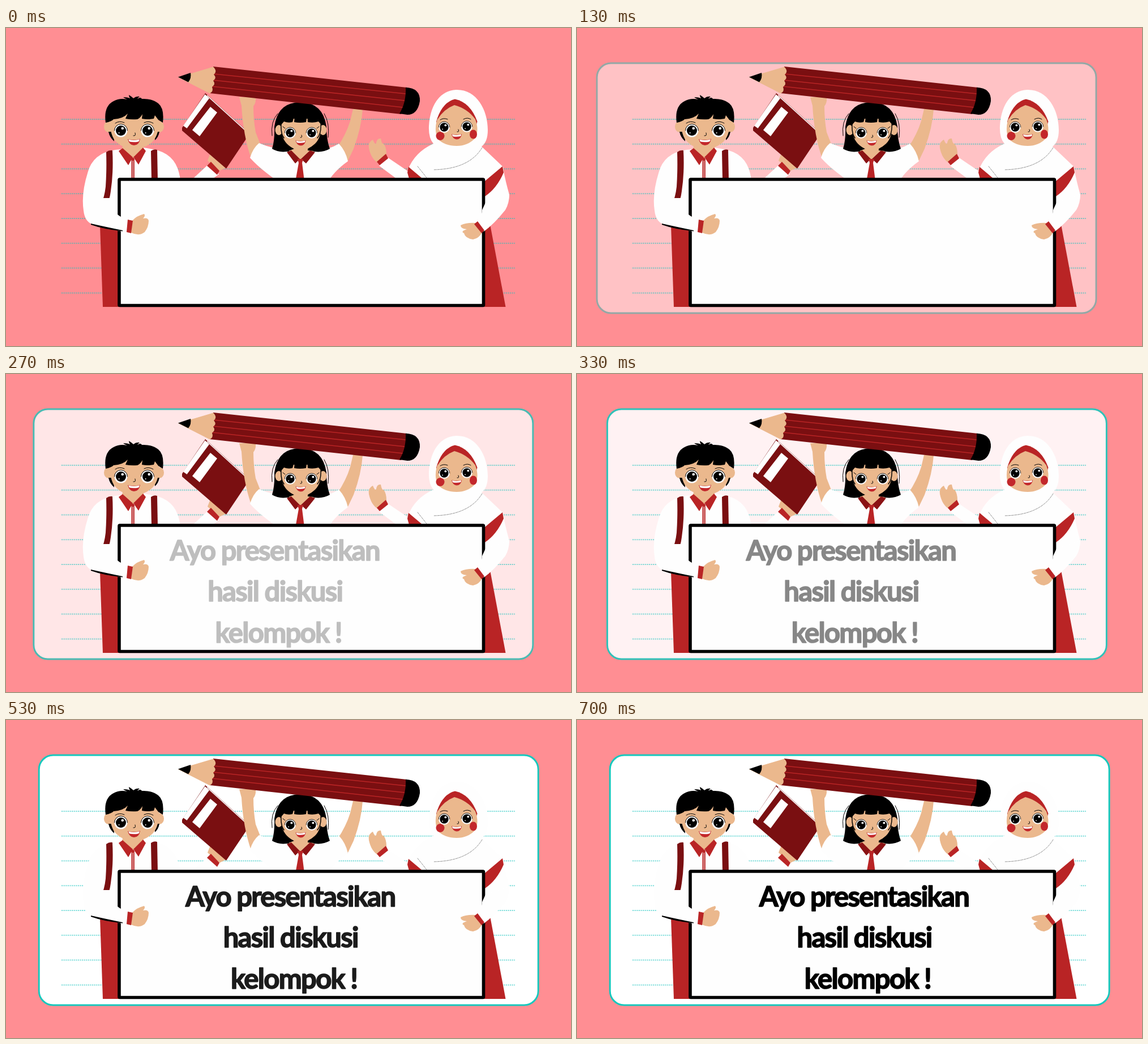
Write an HTML page that moves like this. It is 998 px wide and 561 px high and loops after 4570 ms.

```html
<!DOCTYPE html>
<html lang="id">
<head>
<meta charset="utf-8">
<title>Presentasi kelompok</title>
<style>
  html, body { margin: 0; width: 100%; height: 100%; overflow: hidden; background: #ff8e93; }
  svg { display: block; width: 100vw; height: 100vh; }
  #card, #words { opacity: 0; }
  .skin { fill: #ebb88d; }
  .red { fill: #b92425; }
  .dark { fill: #7a0f11; }
  .white { fill: #fefefe; }
  .line { fill: none; stroke: #000; stroke-linecap: round; }
  .rule { stroke: #17c4bd; stroke-opacity: .55; stroke-width: 2; stroke-dasharray: 2.2 1.4; }
  #words {
    font: 700 49px Lato, "Open Sans", sans-serif;
    letter-spacing: -1.7px;
    text-anchor: middle;
    stroke: #000;
    stroke-width: 1.6;
    stroke-linejoin: round;
  }
</style>
</head>
<body>
<svg viewBox="0 0 998 561">
  <defs>
    <g id="eye">
      <circle r="11.5" fill="#fefefe"/>
      <path class="line" stroke-width="1" d="M-11.500 0A11.500 11.500 0 0 1 11.500 0"/>
      <circle r="9"/>
      <circle cx="2.8" cy="-4" r="2.300" fill="#fefefe"/>
      <circle cx="-3.4" cy="4" r="1" fill="#fefefe"/>
    </g>
    <g id="smile">
      <path fill="#c3272b" d="M-11 -5Q0 -2 11 -5.500Q9 6 0 6Q-8 6 -11 -5Z"/>
      <path class="white" d="M-10 -4.400Q0 -1.500 10 -4.800Q9.500 -2 8 -.6Q0 1 -8 -.4Z"/>
    </g>
  </defs>

  <rect id="card" x="58.200" y="62" width="882" height="441" rx="25" fill="#fff" stroke="#17c8bd" stroke-width="3"/>
  <g id="rules"></g>

  <!-- boy -->
  <path class="red" d="M166 348L171 492H206V348Z"/>
  <path class="white" d="M203 214Q160 216 147 247Q132 290 137 322L204 332V270H308Q304 222 260 214L243 211Z"/>
  <path class="white" d="M330 266L357 241L376 258L365 266Z"/>
  <path class="dark" d="M177 219Q182 215 188 216Q190 255 185 288Q183 304 177 315L168 311Q174 298 176 280Q178 250 177 219Z"/>
  <path class="dark" d="M256 217Q261 213 267 215L268 266H257Z"/>
  <path class="skin" d="M208 200H241L243 213L224 230L205 213Z"/>
  <path class="red" d="M206 212L224 228L216 242L199 217ZM242 211L225 228L234 241L247 217ZM221.500 229H226.800V266H221.500Z"/>
  <path d="M224.200 234V266" stroke="#fefefe" stroke-width="1"/>
  <ellipse class="skin" cx="181" cy="174" rx="8" ry="10"/>
  <ellipse class="skin" cx="271" cy="174" rx="8" ry="10"/>
  <path d="M181 183Q183 193 191 200L190 183ZM271 183Q269 193 263 198L263 183Z"/>
  <path class="skin" d="M184 150H269Q274 188 256 203Q242 213.500 226 214Q207 213 195 201Q181 188 184 150Z"/>
  <path d="M176 167Q172 138 190 129Q201 123 214 126Q209 124 207 122Q215 122 219 124Q217 121 217 118Q222 121 225 124Q230 120 236 121Q233 123 232 125Q238 121 240 125Q258 124 269 133Q280 142 277 167L269 162Q266 158 263 154L261 160Q250 162 240 160L241 152Q237 159 232 161Q221 162 211 160L215 151Q207 160 190 161Q186 165 176 167Z"/>
  <path class="line" stroke-width="1" d="M193 168Q200 163 209 167M244 167Q252 163 260 168M228 185Q230 191 225 190"/>
  <use href="#eye" x="203" y="181"/>
  <use href="#eye" x="250" y="181"/>
  <use href="#smile" x="226" y="201"/>

  <!-- book -->
  <path class="skin" d="M356 234L361 221L377 228L389 246L377 252Z"/>
  <path class="red" d="M362 236L377 252L373 259L355 243Z"/>
  <path class="dark" d="M352 115L428 184L428 190L389 248L311 181V176Z"/>
  <path class="white" d="M351.500 117L359 124L319.500 177L313 172.500ZM329 180L361 139L373 149L342 191Z"/>
  <path d="M355 119L427 184.500" stroke="#fefefe" stroke-width="1.600"/>

  <!-- girl -->
  <path class="skin" d="M412 122H441Q442 132 437 138Q437 162 441 184L452 212L433 230Q419 190 416 137ZM613 143H630Q628 175 614 213L603 236L585 211Q601 187 608 164Z"/>
  <path class="white" d="M447 203Q470 213 500 216H545Q569 216 588 204Q600 217 604 235Q584 249 572 266H474Q446 246 431 229Q436 212 447 203Z"/>
  <path d="M519 131Q560 131 566 174Q566 197 572 213Q560 220 545 218H496Q481 220 470 213Q475 197 474 174Q480 131 519 131Z"/>
  <path class="line" stroke-width="1" d="M480 151Q467 165 470 190M562 151Q572 168 569 193"/>
  <path class="skin" d="M509 204H533V216L544 217L520 235L499 217L509 213Z"/>
  <path fill="#8a1214" d="M504 216L519 231L511 239L496 219ZM537 216L521 231L530 239L546 219Z"/>
  <path class="red" d="M515 231H525L523 238L526.500 266H512L517 238Z"/>
  <ellipse class="skin" cx="482" cy="180" rx="6.500" ry="9"/>
  <ellipse class="skin" cx="560" cy="180" rx="6.500" ry="9"/>
  <path class="skin" d="M485 160H557Q559 191 546 204Q534 215 521 216Q507 215 496 204Q483 190 485 160Z"/>
  <path d="M484 160Q490 140 520 138Q551 140 558 160V172L552 165Q543 168 533 166L532 153L530 166Q519 168 509 166L510 153L506 166Q498 168 491 165L484 173Z"/>
  <path class="line" stroke-width="1.500" d="M486 170Q485 186 491 194M556 170Q557 186 550 194"/>
  <path class="line" stroke-width="1" d="M522 189Q524 194 520 193M493 177L489 174M549 177L553 174"/>
  <use href="#eye" transform="translate(502 185) scale(.85)"/>
  <use href="#eye" transform="translate(540 185) scale(.85)"/>
  <use href="#smile" transform="translate(520.500 202.500) scale(.83)"/>

  <!-- pencil -->
  <path class="dark" d="M366 68L708 105Q710 130 698 152L360 115Z"/>
  <path d="M367 81L706 116M366 92L704 128M364 103L701 140" stroke="#b92425" stroke-width="1.500"/>
  <path class="skin" d="M304 87L366 68.500Q374 76 367 82Q373 88 366 93Q371 99 364 104Q367 112 360 115.500Z"/>
  <path d="M304 86.500L326 79Q328 88 322 95.500Z"/>
  <path d="M706 104.800Q732 106 731 129Q727 153 709 153L695 151Q707 132 706 104.800Z"/>

  <!-- girl with veil -->
  <path class="red" d="M844 346H855L882.500 492H844Z"/>
  <path class="skin" d="M641 212Q639 201 648 197Q652 207 654 203Q655 194 662 195Q664 206 667 204Q672 211 672 222L657 238Q645 231 641 212Z"/>
  <path class="white" d="M659 243L675 229L712 254L718 266H690Z"/>
  <path class="red" d="M671 222L675 230L660 242L655 236Z"/>
  <path class="white" d="M795 109C831 108 851 144 851 180Q851 201 840 209L878 245Q880 262 889 294Q888 318 846 345V266H722L710 250Q722 219 755 204Q746 194 747 173C749 136 767 110 795 109Z"/>
  <path class="red" d="M711 245L736 266H712L709 255ZM846 270L877 244L879 255Q867 283 846 297Z"/>
  <path class="line" style="stroke:#666" stroke-width=".7" stroke-dasharray="4 1.500" d="M841 211Q818 249 755 250M727 244L743 264"/>
  <path class="red" d="M793 125.500Q770 131 760 165L764 180L828 180L832.500 165Q820 131 793 125.500Z"/>
  <path class="skin" d="M792 136Q815 142 829 161Q836 180 829 194Q816 208 796 208Q775 208 763 196Q756 182 761 163Q773 143 792 136Z"/>
  <ellipse cx="767" cy="190.500" rx="7.500" ry="7.500" fill="#c3272b"/>
  <ellipse cx="825.500" cy="187.500" rx="6.500" ry="8" fill="#c3272b"/>
  <path class="line" stroke-width="1" d="M767 162Q773 158 780 161M808 161Q815 157 821 161M799 179Q801 184 797 183"/>
  <use href="#eye" transform="translate(774 175) scale(.85)"/>
  <use href="#eye" transform="translate(814 174) scale(.85)"/>
  <use href="#smile" transform="translate(796 191.500) scale(.83)"/>

  <!-- banner -->
  <rect x="200" y="267" width="643.500" height="222.500" rx="1" fill="#fefefe" stroke="#000" stroke-width="5.600" stroke-linejoin="round"/>

  <!-- hands over the banner -->
  <path class="white" d="M137 300V322Q139 341 152 346L213 361L218 339Q204 335 197 329V300Z"/>
  <path d="M150 345Q172 350 206 357L206 358.500Q172 355 150 347Z"/>
  <path class="skin" d="M223 340Q231 331 244 328Q247 331 242 336Q251 334 252 340Q252 351 245 360Q235 368 221 361Z"/>
  <path class="red" d="M215 338L224 340L221 362L213 360Z"/>
  <path class="white" d="M889 294Q889 309 882 321Q862 346 844 359L832 342Q842 328 841 321L847 308Z"/>
  <path class="skin" d="M803 348Q814 343 829 344L841 360Q836 371 825 373Q811 371 809 362Q802 359 814 355Q803 354 803 348Z"/>
  <path class="red" d="M827 346L833 341L845 357L840 362Z"/>

  <g id="words">
    <text x="507" y="328.500">Ayo presentasikan</text>
    <text x="507.500" y="401">hasil diskusi</text>
    <text x="513.500" y="473.500">kelompok !</text>
  </g>
</svg>
<script>
  const LOOP = 4570, STEP = 100 / 3, ENTER = 500, SHIFT = 43;
  const $ = id => document.getElementById(id);

  $('rules').innerHTML = Array.from({ length: 8 }, (_, i) => {
    const y = 161 + i * 43.77;
    return `<path class="rule" d="M98 ${y}H899"/>`;
  }).join('');

  // Slide in from the left while fading in, quadratic ease-out.
  function enter(el, t) {
    const rest = 1 - Math.min(1, Math.max(0, t / ENTER));
    el.style.opacity = 1 - rest * rest;
    el.setAttribute('transform', `translate(${-SHIFT * rest * rest} 0)`);
  }

  // The motion advances at 30 steps per second.
  function draw() {
    const t = Math.floor((performance.now() % LOOP + 3.4) / STEP) * STEP;
    enter($('card'), t);
    enter($('words'), t - 200);
    requestAnimationFrame(draw);
  }
  draw();
</script>
</body>
</html>
```
